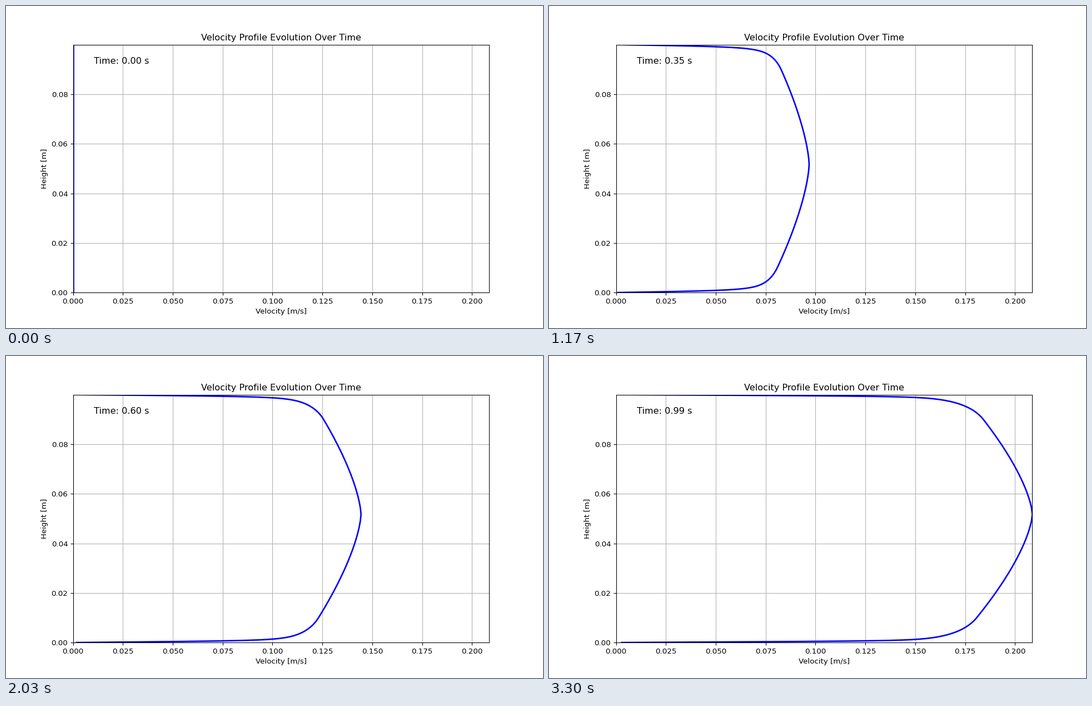
A matplotlib script for the animation above (3330 ms loop, 966 px wide and 580 px high).

```python
import numpy as np
import matplotlib.pyplot as plt
from matplotlib.animation import FuncAnimation

FRAMES = 100
DT = 0.01            # simulated seconds per frame
HEIGHT = 0.1         # channel height
PEAK = 0.0517        # height of the fastest layer
FIRST = 1.25e-5      # distance of the first node from a wall
LOG_EDGE = 0.0101    # outer end of the logarithmic layer

# Nodes cluster towards both walls
lower = np.geomspace(FIRST, PEAK, 160)
upper = HEIGHT - np.geomspace(FIRST, HEIGHT - PEAK, 160)[::-1]
y = np.concatenate([lower, upper[1:]])
wall = np.minimum(y, HEIGHT - y)


def peak_speed(t):
    lt = np.log(t)
    return 0.2103 * np.exp(0.742 * lt - 0.0054 * (lt + 0.01) * (lt + 1.6))


def profile(t):
    """Velocity over the height: core, logarithmic layer, viscous sublayer."""
    if t == 0:
        return np.zeros_like(y)
    core = peak_speed(t) - 3.3 * t**0.54 * np.abs(y - PEAK)**1.5
    r = np.minimum(wall / LOG_EDGE, 1)
    outer = core * (1 - 0.09 * (r - 1 - np.log(r)))
    viscous = 224 * t**1.08 * wall
    n = max(4 * t**0.35, 1.8)
    return (viscous**-n + outer**-n)**(-1 / n)


fig, ax = plt.subplots(figsize=(10, 6.0042), dpi=96.6)
ax.set_xlim(0, 0.2087)
ax.set_ylim(0, HEIGHT - FIRST)
ax.set_xlabel("Velocity [m/s]")
ax.set_ylabel("Height [m]")
ax.set_title("Velocity Profile Evolution Over Time")
ax.grid(True)

line, = ax.plot([], [], color="blue", lw=2)
clock = ax.text(0.05, 0.95, "", transform=ax.transAxes, fontsize=12, va="top")


def update(frame):
    t = frame * DT
    line.set_data(profile(t), y)
    clock.set_text(f"Time: {t:.2f} s")
    return line, clock


anim = FuncAnimation(fig, update, frames=FRAMES, interval=33.3,
                     init_func=lambda: update(0), repeat=True, repeat_delay=0)
plt.show()
```
